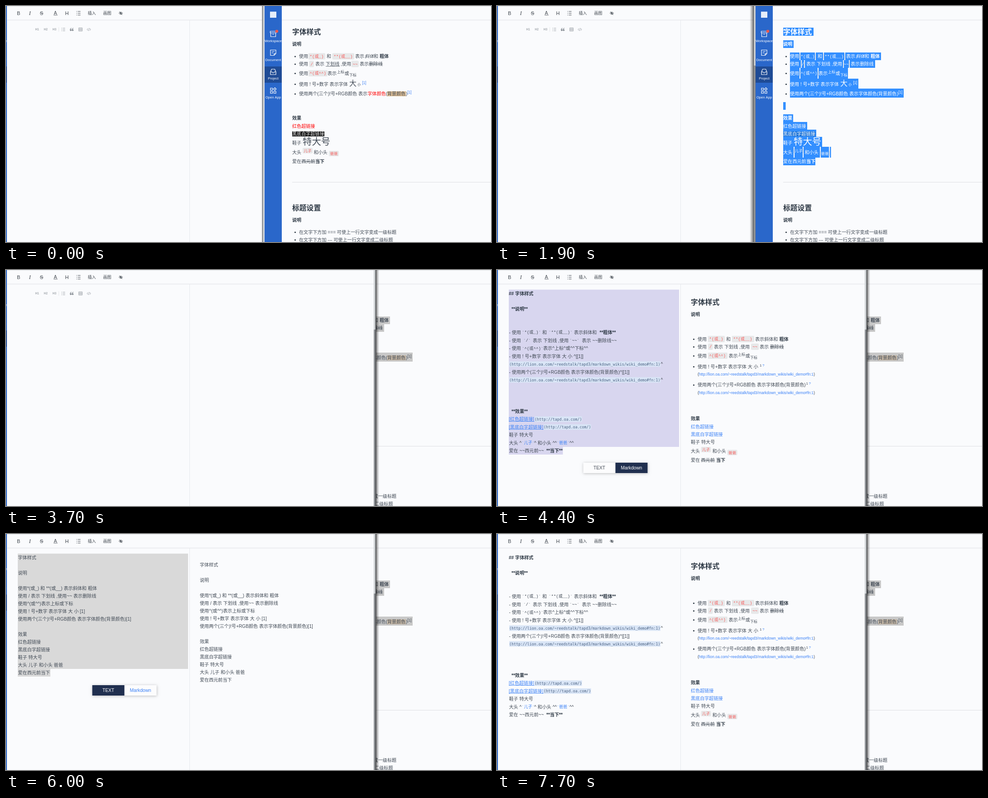
Recreate the animation shown at these times as an HTML page with a canvas. Size 1071 by 523 pixels, loop 8000 ms.

```html
<!DOCTYPE html>
<html lang="zh">
<head>
<meta charset="utf-8">
<style>
html, body { margin: 0; width: 100%; height: 100%; overflow: hidden; background: #fafbfd; }
canvas { display: block; }
</style>
</head>
<body>
<canvas id="stage" width="1071" height="523"></canvas>
<script>
const c = document.getElementById('stage').getContext('2d');
const SANS = '"Liberation Sans","Noto Sans CJK SC","Noto Sans CJK",sans-serif';
const CODE = '"Liberation Mono","Noto Sans CJK SC","Noto Sans CJK",monospace';
const MONO = '"DejaVu Sans Mono","Noto Sans CJK SC",monospace';
const PAGE = '#fafbfd', INK = '#414a55', DARK = '#2d3844', BLUE = '#3a80f6', RED = '#f75c5c', SIDE = '#2a67ca';
const SIZE = 10.1;
const URL_TEXT = 'http://lion.oa.com/~reedstalk/tapd3/markdown_wikis/wiki_demo#fn:1';
let tint = null; // overrides text colour inside a selection

function rect(x0, y0, x1, y1, color) {
  c.fillStyle = color;
  c.fillRect(x0, y0, x1 - x0, y1 - y0);
}
function text(s, x, mid, size = SIZE, color = INK, style = '', font = SANS) {
  c.font = `${style} ${size}px ${font}`;
  c.fillStyle = tint || color;
  c.fillText(s, x, mid + size * 0.37);
}
const bold = (s, x, mid, size = SIZE) => text(s, x, mid, size, DARK, 'bold');
const mono = (s, x, mid, color = INK) => text(s, x, mid, 9.1, color, '', CODE);
// highlighted text shows no underline or strike
function rule(x0, x1, y, color = INK) {
  if (tint !== '#fff') rect(x0, y, x1, y + 0.8, color);
}
function strike(s, x, mid) {
  text(s, x, mid);
  rule(x, x + s.length * SIZE, mid);
}
function chip(s, x0, x1, mid) {
  if (!tint) round(x0, mid - 7, x1, mid + 7, '#e7e8e9');
  mono(s, x0 + 3, mid, RED);
}
function smallChip(s, x, mid) {
  if (!tint) round(x, mid - 6, x + 22, mid + 6, '#e7e8e9');
  text(s, x + 2.5, mid, 8.5, RED);
}
function round(x0, y0, x1, y1, color) {
  c.fillStyle = color;
  c.beginPath();
  c.roundRect(x0, y0, x1 - x0, y1 - y0, 2);
  c.fill();
}
function dot(x, y, r, color) {
  c.fillStyle = color;
  c.beginPath();
  c.arc(x, y, r, 0, 7);
  c.fill();
}
function stroke(path, color, width = 1) {
  c.strokeStyle = color;
  c.lineWidth = width;
  c.stroke(new Path2D(path));
}
function clipped(x0, y0, x1, y1, draw) {
  c.save();
  c.beginPath();
  c.rect(x0, y0, x1 - x0, y1 - y0);
  c.clip();
  draw();
  c.restore();
}
function fade(x0, x1, from, to, y0 = 0, y1 = 523) {
  const g = c.createLinearGradient(x0, 0, x1, 0);
  g.addColorStop(0, from);
  g.addColorStop(1, to);
  rect(x0, y0, x1, y1, g);
}

function sidebar(dx, hover) {
  const edge = hover ? 610 : 609;
  c.save();
  c.translate(dx, 0);
  rect(571, 0, edge, 523, SIDE);
  rect(571, 134, edge, 170, '#1f4b95');
  if (hover) rect(571, 176, edge, 211, '#2557ae');
  rect(583, 12.5, 597, 26, '#e6eefa');
  stroke('M583.5 56h13v3.500h-13zM584.500 59.500v8.500h11v-8.500M588 62.500h4' +
    'M584 97.500h12v8l-4 4h-8zM592 109v-3.500h4M587 101h6M587 104h3' +
    'M584 146l2.500-6h7l2.500 6v6h-12zM584 146h3.500l1 2h3l1-2h3.500' +
    'M584 182h4.500v4.500h-4.500zM584 189h4.500v4.500h-4.500zM591.500 189h4.500v4.500h-4.500z' +
    'M593.700 181l3 3-3 3-3-3z', '#fff', 1.2);
  dot(598, 56, 3.3, '#ee5a4f');
  c.textAlign = 'center';
  ['Workspace', 'Document', 'Project', 'Open App'].forEach((s, i) =>
    text(s, 590, 77 + i * 41.8, 7.6, '#fff'));
  c.restore();
}

function article() {
  bold('字体样式', 632, 57.5, 15.8);
  bold('说明', 632, 84.5);

  text('使用', 647, 111.5);
  chip('*(或_)', 667.5, 705, 111.5);
  text('和', 708, 111.5);
  chip('**(或__)', 720.5, 769, 111.5);
  text('表示', 771, 111.5);
  text('斜体', 792, 111.5, SIZE, INK, 'italic');
  text('和', 812, 111.5);
  bold('粗体', 825, 111.5);

  text('使用', 647, 128.5);
  chip('/', 669.5, 680, 128.5);
  text('表示', 683, 128.5);
  text('下划线', 706, 128.5);
  rule(706, 737, 133);
  text(',使用', 739, 128.5);
  chip('~~', 762.5, 779, 128.5);
  text('表示', 781, 128.5);
  strike('删除线', 801.5, 128.5);

  text('使用', 647, 149);
  chip('^(或^^)', 667.5, 710, 149);
  text('表示', 710, 149);
  text('上标', 731, 146, 8);
  text('或', 747.5, 149);
  text('下标', 758, 153, 8);

  text('使用 ! 号+数字 表示字体', 647, 173);
  text('大', 758, 171.5, 16);
  text('小', 776, 174, 7.5);
  text('[1]', 786.5, 170, 8.2, BLUE);

  text('使用两个(三个)!号+RGB颜色 表示', 647, 194.5);
  text('字体颜色', 798.5, 194.5, SIZE, '#f00');
  text('(', 839, 194.5);
  if (!tint) rect(842, 189, 883, 200, '#dfbf95');
  text('背景颜色', 842, 194.5);
  text(')', 883, 194.5);
  text('[1]', 886.5, 191, 8.2, BLUE);

  bold('效果', 632, 248.5);
  text('红色超链接', 632, 266, SIZE, '#f00');
  if (!tint) rect(632, 278, 703, 289, '#000');
  text('黑底白字超链接', 632, 283, SIZE, '#fff');
  text('鞋子', 632, 303);
  text('特大号', 655, 300, 20.4);
  text('大头', 632, 324);
  smallChip('儿子', 655, 320.5);
  text('和小头', 679.5, 324);
  smallChip('爸爸', 713, 327);
  text('爱在', 632, 344.5);
  strike('西元前', 652.4, 344.5);
  bold('当下', 683, 344.5);
}

// top, bottom, then start and end of each selected run
const SELECTED = [
  [48, 66, 632, 699], [76, 93, 632, 655],
  [103, 120, 647, 668, 670, 702, 704, 720, 722, 767, 769, 848],
  [120, 137, 647, 671, 673, 678, 680, 764, 766, 777, 779, 835],
  [137, 161, 647, 668, 670, 708, 710, 775],
  [161, 183, 647, 798], [183, 203, 647, 898], [213, 230, 632, 637.5],
  [240, 257, 632, 654], [257, 274, 632, 685], [274, 290, 632, 705],
  [290, 312, 632, 718], [312, 336, 632, 655, 657, 675, 677, 713, 715, 733, 735, 737.5],
  [336, 353, 632, 703]
];
function selection(limit, active) {
  clipped(610, 32, 1071, limit, () => {
    for (const [top, bottom, ...runs] of SELECTED)
      for (let i = 0; i < runs.length; i += 2)
        rect(runs[i], top, runs[i + 1], bottom, active ? '#338fff' : '#c8c8c8');
    if (active) rect(632, 278, 703, 289, '#1d74d8');
    else rect(842, 189, 883, 200, '#c8b9a6');
    tint = active ? '#fff' : INK;
    article();
    tint = null;
  });
}

function header(x0, x1) {
  rect(x0, 0, x1, 1, '#e3e5e8');
  rect(x0, 30, x1, 31, '#eff0f3');
  rect(x0, 31, x1, 32, '#e9eaee');
}

function rightWindow(t, active) {
  rect(567, 0, 1071, 523, PAGE);
  header(609, 1071);
  sidebar(0, t >= 3500 && t < 3700);
  article();
  for (const y of [111.5, 128.5, 149, 173, 194.5, 501, 518]) dot(638.5, y + 0.5, 1.6, DARK);
  rect(632, 390, 1071, 391, '#dddfe3');
  bold('标题设置', 632, 447, 15.8);
  bold('说明', 632, 474);
  text('在文字下方加 === 可使上一行文字变成一级标题', 647, 501);
  text('在文字下方加 --- 可使上一行文字变成二级标题', 647, 518);

  const limits = [66, 120, 161, 230, 290, 336];
  const step = Math.floor((t - 1200) / 100);
  if (step >= 0) selection(t >= 1900 ? 353 : limits[Math.min(step, 5)], active);
  if (t >= 2700 && t < 3300) contextMenu(t >= 3000);
}

function contextMenu(hover) {
  rect(713, 190, 1071, 265, '#c4c4c4');
  rect(714, 191, 1071, 264, '#fff');
  if (hover) rect(714, 192, 1071, 208, '#e8e8e9');
  rect(716, 243, 1071, 244, '#e6e6e6');
  const items = ['复制(C)', '搜索“字体样式 说明 使用*(或_) 和 **(或__)...”(S)', '打印(P)...', '检查(N)'];
  const keys = ['Ctrl+C', '', 'Ctrl+P', 'Ctrl+Shift+I'];
  items.forEach((s, i) => {
    const y = 200 + i * 16 + (i > 2 ? 7 : 0);
    text(s, 733, y, 8.7, '#222');
    c.textAlign = 'right';
    text(keys[i], 1052, y, 8.7, '#222');
    c.textAlign = 'left';
  });
}

function toolbar() {
  const ink = '#3c434b';
  text('B', 24.3, 16, 10.5, ink);
  text('I', 50.8, 16, 12, ink, 'italic', '"Liberation Serif",serif');
  text('S', 75, 16, 10.5, ink);
  rule(74.5, 82.5, 15.6, ink);
  text('A', 105.7, 15, 10, ink);
  rule(105, 114, 19.7, ink);
  text('H', 130.4, 16, 11, ink);
  stroke('M158.500 12h6M158.500 16h6M158.500 20h6M155.500 12h1.300M155.500 16h1.300M155.500 20h1.300', ink);
  text('插入', 180.5, 16, 9, ink);
  text('画图', 214.5, 16, 9, ink);
  stroke('M249.500 16q4-5 8 0q-4 5-8 0M250.500 12.500l6 7', ink);
  dot(253.5, 16, 1.6, ink);
}
function hints() {
  const grey = '#a3a8ae';
  ['H1', 'H2', 'H3'].forEach((s, i) => text(s, 64.5 + i * 19.1, 52, 6.6, grey, 'bold'));
  rect(116, 47, 117, 57, '#e6e8eb');
  stroke('M125.500 49h5M125.500 52h5M125.500 55h5M122.500 49h1.500M122.500 52h1.500M122.500 55h1.500' +
    'M160.500 48.500h8v7h-8zM160.500 52h8M163 48.500v7M166 48.500v7' +
    'M181 49.500l-2 2.500 2 2.500M185 49.500l2 2.500-2 2.500M183.800 48.800l-1.500 6.400', grey);
  for (const x of [143, 147.3]) {
    dot(x, 53.5, 1.9, '#8b9198');
    stroke(`M${x - 1.3} 53.500q0-4 3-4.500`, '#8b9198', 1.2);
  }
}

function markup() {
  const address = (s, x, mid) => {
    rect(x, mid - 6, x + s.length * 4.985, mid + 6, '#d9e5f6');
    text(s, x, mid, 8.28, '#4c6384', '', MONO);
  };
  bold('## 字体样式', 26, 52);
  bold('**说明**', 32, 86);
  for (const y of [138, 156, 173.5]) text('- 使用', 26.5, y);
  mono('`*(或_)`', 55, 138);
  text('和', 100, 138);
  mono('`**(或__)`', 114, 138);
  text('表示斜体和', 170, 138);
  bold('**粗体**', 226.5, 138);
  mono('`/`', 58, 156);
  text('表示 下划线 ,使用', 79, 156);
  mono('`~~`', 160, 156);
  text('表示 ~~删除线~~', 187.5, 156);
  mono('`^(或^^)`', 55, 173.5);
  text('表示^上标^或^^下标^^', 102, 173.5);
  text('- 使用 ! 号+数字 表示字体 大 小 ^[[1]]', 26.5, 191);
  text('- 使用两个(三个)!号+RGB颜色 表示字体颜色(背景颜色)^[[1]]', 26.5, 226);
  for (const y of [208.5, 243.5]) {
    address(`(${URL_TEXT})`, 27, y);
    text('^', 361.5, y);
  }
  bold('**效果**', 32, 313);
  [['[红色超链接]', 83, 330.5], ['[黑底白字超链接]', 103, 348]].forEach(([s, x, y]) => {
    text(s, 26, y, SIZE, BLUE);
    rule(26, x - 0.5, y + 4.5, BLUE);
    address('(http://tapd.oa.com/)', x, y);
  });
  text('鞋子 特大号', 26.5, 365.5);
  text('大头 ^', 26.5, 383);
  mono('`儿子`', 54, 383, BLUE);
  text('^ 和小头 ^^', 82, 383);
  mono('`爸爸`', 131.5, 383, BLUE);
  text('^^', 160, 383);
  text('爱在 ~~西元前~~', 26.5, 400.5);
  bold('**当下**', 109, 400.5);
}

function preview() {
  bold('字体样式', 428, 71, 15.8);
  bold('说明', 428, 98);
  for (const y of [153, 170, 190]) text('使用', 443, y);
  for (const y of [153, 170, 190, 214, 254.5]) dot(434.5, y + 0.5, 1.6, DARK);
  chip('*(或_)', 465.5, 503, 153);
  text('和', 506, 153);
  chip('**(或__)', 518.5, 568, 153);
  text('表示斜体和', 570, 153);
  bold('粗体', 623.5, 153);
  chip('/', 466, 476.5, 170);
  text('表示 下划线 ,使用', 479, 170);
  chip('~~', 561, 578, 170);
  text('表示', 580, 170);
  strike('删除线', 603, 170);
  chip('^(或^^)', 465.5, 509, 190);
  text('表示', 511.5, 190);
  text('上标', 532, 187, 8);
  text('或', 548.5, 190);
  text('下标', 559, 194, 8);
  text('使用 ! 号+数字 表示字体 大 小', 443, 214);
  text('使用两个(三个)!号+RGB颜色 表示字体颜色(背景颜色)', 443, 254.5);
  [[580, 214], [682.5, 254.5]].forEach(([x, y]) => {
    text('1', x, y - 3, 8);
    text('?', x + 6, y - 3, 8, BLUE);
    text('(', 443, y + 17, 8.42);
    text(URL_TEXT, 445.8, y + 17, 8.42, BLUE);
    text(')', 445.8 + c.measureText(URL_TEXT).width, y + 17, 8.42);
  });
  bold('效果', 428, 329.5);
  text('红色超链接', 428, 347, SIZE, BLUE);
  text('黑底白字超链接', 428, 364, SIZE, BLUE);
  text('鞋子 特大号', 428, 381);
  text('大头', 428, 401);
  smallChip('儿子', 450.5, 398);
  text('和小头', 475.5, 401);
  smallChip('爸爸', 508.5, 404.5);
  text('爱在', 428, 421.5);
  strike('西元前', 450.5, 421.5);
  bold('当下', 484, 421.5);
}

const PLAIN = ['字体样式', '', '说明', '', '使用*(或_) 和 **(或__) 表示斜体和 粗体', '使用 / 表示 下划线 ,使用~~ 表示删除线',
  '使用^(或^^)表示上标或下标', '使用 ! 号+数字 表示字体 大 小 [1]', '使用两个(三个)!号+RGB颜色 表示字体颜色(背景颜色)[1]',
  '', '效果', '红色超链接', '黑底白字超链接', '鞋子 特大号', '大头 儿子 和小头 爸爸', '爱在西元前当下'];
function plainText() {
  PLAIN.forEach((s, i) => {
    text(s, 26.5, 52 + i * 17.05);
    text(s, 428, 68 + i * 17.05);
  });
}

function popup(top, plain, hover) {
  c.save();
  c.shadowColor = 'rgba(0,0,0,.25)';
  c.shadowBlur = 6;
  c.shadowOffsetY = 1;
  rect(190.5, top, 332.5, top + 23, '#fcfcfd');
  c.restore();
  const x = plain ? 190.5 : 261.5;
  rect(x, top, x + 71, top + 23, '#202f4f');
  c.textAlign = 'center';
  text('TEXT', 226, top + 11.5, 10.2, plain ? '#fff' : '#454c58');
  text('Markdown', 297, top + 11.5, 10.2, plain ? (hover ? '#3a80f6' : '#454c58') : '#fff');
  c.textAlign = 'left';
}

function leftWindow(t, front) {
  const edge = front ? 816 : 567;
  rect(0, 0, edge, 523, PAGE);
  clipped(0, 0, 2.6, 523, () => sidebar(-607, false));
  header(2.6, edge);
  toolbar();
  rect(405, 32, 406, 523, '#e6e8ec');
  if (t < 4300) {
    hints();
    if (t >= 3900) rect(26, 45, 27, 60, INK);
    return;
  }
  const plain = t >= 5600 && t < 6500;
  const chosen = t < 7200;
  if (chosen) {
    const shade = t < 5400 ? '#d8d6ef' : '#d9d9d9';
    const end = plain ? 299 : 392;
    rect(26, 43.5, 402, end, shade);
    rect(26, end, plain ? 98 : 145.5, end + 17, shade);
  }
  if (plain) plainText();
  else {
    markup();
    preview();
  }
  if (chosen) {
    c.globalAlpha = t < 4400 ? 0.5 : 1;
    popup(plain ? 335 : 427, plain, t >= 6000);
    c.globalAlpha = 1;
  } else if (t < 7700) rect(145, 392, 146, 407, INK);
}

// window border strip, lighter along its upper part
function border(x0, x1) {
  fade(x0, x1, '#d3d6d9', '#c3c6c9', 0, 132);
  fade(x0, x1, '#989b9f', '#808387', 132, 523);
}

function draw(now) {
  const t = now % 8000;
  const front = t >= 3700;
  rightWindow(t, !front);
  leftWindow(t, front);
  if (front) {
    border(812, 816);
    rect(816, 0, 817.5, 523, '#333537');
    fade(817.5, 824, 'rgba(0,0,0,.45)', 'rgba(0,0,0,0)');
  } else if (t >= 1000) {
    fade(558, 567, 'rgba(0,0,0,0)', 'rgba(0,0,0,.55)');
    rect(566, 0, 567.5, 523, '#4a4c4e');
    border(567.5, 571);
  } else {
    fade(563, 566, 'rgba(0,0,0,0)', 'rgba(0,0,0,.15)');
    rect(566, 0, 567, 523, '#55585c');
    fade(567, 571, '#b5b9be', '#e4e7ea');
  }
  requestAnimationFrame(draw);
}
requestAnimationFrame(draw);
</script>
</body>
</html>
```
